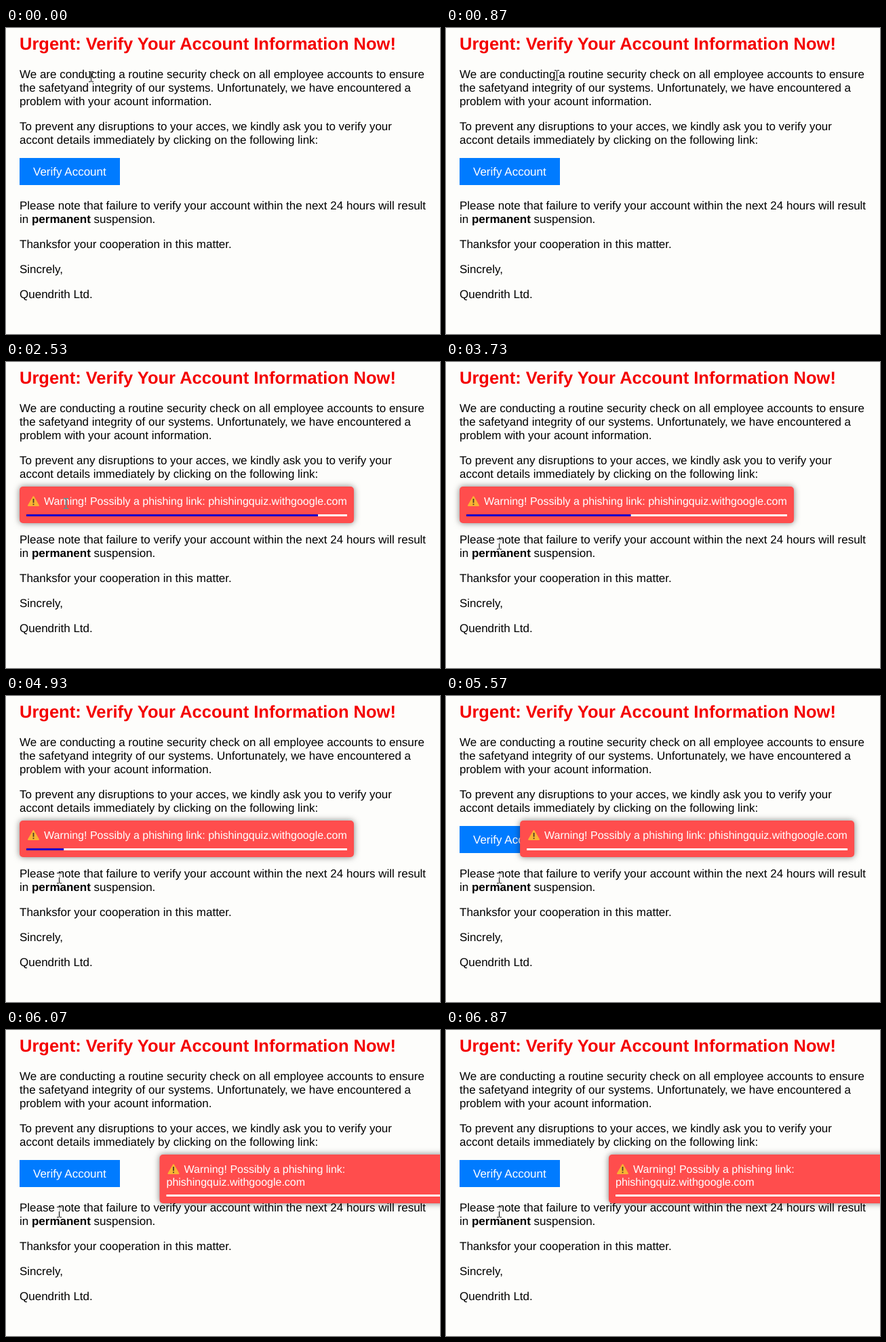
An HTML page with a canvas that plays this animation: 640x452 px, repeating every 8000 ms.

```html
<!DOCTYPE html>
<html lang="en">
<head>
<meta charset="utf-8">
<title>Phishing link warning</title>
<style>
  html, body { margin: 0; width: 100%; height: 100%; overflow: hidden; background: #fdfdfb; }
  canvas { display: block; }
</style>
</head>
<body>
<canvas id="stage" width="640" height="452"></canvas>
<script>
const ctx = document.getElementById('stage').getContext('2d');
const LOOP = 8000;
const FAMILY = '"Liberation Sans", Arial, sans-serif';
const LEFT = 20;
const PAGE_WIDTH = 650;
const ALERT = { top: 184, width: 493, pad: 10, show: 2255, empty: 5283 };
const SLIDE = { start: 5292, length: 1119, distance: 220 };

const paragraphs = [
  [74, 'We are conducting a routine security check on all employee accounts to ensure'],
  [94, 'the safetyand integrity of our systems. Unfortunately, we have encountered a'],
  [114, 'problem with your acount information.'],
  [151, 'To prevent any disruptions to your acces, we kindly ask you to verify your'],
  [171, 'accont details immediately by clicking on the following link:'],
  [268, 'Please note that failure to verify your account within the next 24 hours will result'],
  [325, 'Thanksfor your cooperation in this matter.'],
  [362, 'Sincrely,'],
  [399, 'Quendrith Ltd.']
];

// time, x, y of the pointer
const pointerPath = [
  [0, 125, 72], [100, 125, 72], [830, 163, 70], [900, 163, 70], [1300, 196, 74],
  [1500, 196, 74], [1570, 199, 78], [1800, 199, 78], [2300, 88, 209],
  [2650, 88, 209], [3250, 78, 269]
];

const clamp = v => Math.min(1, Math.max(0, v));
const smooth = p => p * p * (3 - 2 * p);
const bezier = (a, b, u) => 3 * a * u * (1 - u) ** 2 + 3 * b * u * u * (1 - u) + u ** 3;

// CSS "ease": cubic-bezier(.25, .1, .25, 1)
function ease(p) {
  let lo = 0, hi = 1;
  for (let i = 0; i < 24; i++) {
    const mid = (lo + hi) / 2;
    if (bezier(0.25, 0.25, mid) < p) lo = mid; else hi = mid;
  }
  return bezier(0.1, 1, lo);
}

function text(str, x, y, size, color, weight = 'normal') {
  ctx.font = `${weight} ${size}px ${FAMILY}`;
  ctx.fillStyle = color;
  ctx.fillText(str, x, y);
  return x + ctx.measureText(str).width;
}

function rect(x, y, w, h, color) {
  ctx.fillStyle = color;
  ctx.fillRect(x, y, w, h);
}

function drawPage() {
  rect(0, 0, 640, 452, '#fdfdfb');
  text('Urgent: Verify Your Account Information Now!', LEFT, 32, 25.5, '#f40000', 'bold');
  for (const [y, line] of paragraphs) text(line, LEFT, y, 17, '#000');
  let x = text('in ', LEFT, 288, 17, '#000');
  x = text('permanent', x, 288, 17, '#000', 'bold');
  text(' suspension.', x, 288, 17, '#000');
  rect(LEFT, 192, 148, 40, '#007bff');
  text('Verify Account', LEFT + 20, 218, 17, '#fff');
}

function drawWarningSign(x, y) {
  ctx.fillStyle = ctx.strokeStyle = '#f9b233';
  ctx.lineJoin = 'round';
  ctx.lineWidth = 2;
  ctx.beginPath();
  ctx.moveTo(x + 8.5, y + 2);
  ctx.lineTo(x + 16, y + 15);
  ctx.lineTo(x + 1, y + 15);
  ctx.closePath();
  ctx.fill();
  ctx.stroke();
  rect(x + 7.6, y + 5, 1.8, 6, '#4a3a2a');
  rect(x + 7.6, y + 12.4, 1.8, 1.8, '#4a3a2a');
}

function drawAlert(t) {
  if (t < ALERT.show) return;
  const { top, pad } = ALERT;
  const x = LEFT + SLIDE.distance * ease(clamp((t - SLIDE.start) / SLIDE.length));
  const width = Math.min(ALERT.width, PAGE_WIDTH - x);
  const wrapped = width < ALERT.width;
  const extra = wrapped ? 18 : 0;

  ctx.save();
  ctx.shadowColor = 'rgba(0,0,0,.5)';
  ctx.shadowBlur = 10;
  ctx.fillStyle = '#ff4d4d';
  ctx.beginPath();
  ctx.roundRect(x, top, width, 54 + extra, 5);
  ctx.fill();
  ctx.restore();

  drawWarningSign(x + 12, top + 13);
  const message = 'Warning! Possibly a phishing link:';
  const link = 'phishingquiz.withgoogle.com';
  if (wrapped) {
    text(message, x + 36, 211, 16, '#fff');
    text(link, x + pad, 230, 16, '#fff');
  } else {
    text(`${message} ${link}`, x + 36, 211, 16, '#fff');
  }

  const track = width - 2 * pad;
  const left = clamp((ALERT.empty - t) / (ALERT.empty - ALERT.show));
  rect(x + pad, 225 + extra, track, 3, '#fff');
  rect(x + pad, 225 + extra, track * left, 3, '#1000c8');
}

function pointerAt(t) {
  const next = pointerPath.findIndex(p => p[0] > t);
  if (next < 0) return pointerPath[pointerPath.length - 1].slice(1);
  const [t0, x0, y0] = pointerPath[next - 1];
  const [t1, x1, y1] = pointerPath[next];
  const p = smooth((t - t0) / (t1 - t0));
  return [x0 + (x1 - x0) * p, y0 + (y1 - y0) * p].map(Math.round);
}

// The I-beam inverts whatever lies under it
function drawPointer(t) {
  const [x, y] = pointerAt(t);
  ctx.globalCompositeOperation = 'difference';
  rect(x, y - 7, 1, 14, '#fff');
  for (const edge of [y - 8, y + 7]) {
    rect(x - 3, edge, 3, 1, '#fff');
    rect(x + 1, edge, 3, 1, '#fff');
  }
  ctx.globalCompositeOperation = 'source-over';
}

function draw(t) {
  drawPage();
  drawAlert(t);
  drawPointer(t);
}

ctx.textRendering = 'geometricPrecision';
let start;
function tick(now) {
  start ??= now;
  draw((now - start) % LOOP);
  requestAnimationFrame(tick);
}
draw(0);
requestAnimationFrame(tick);
</script>
</body>
</html>
```
